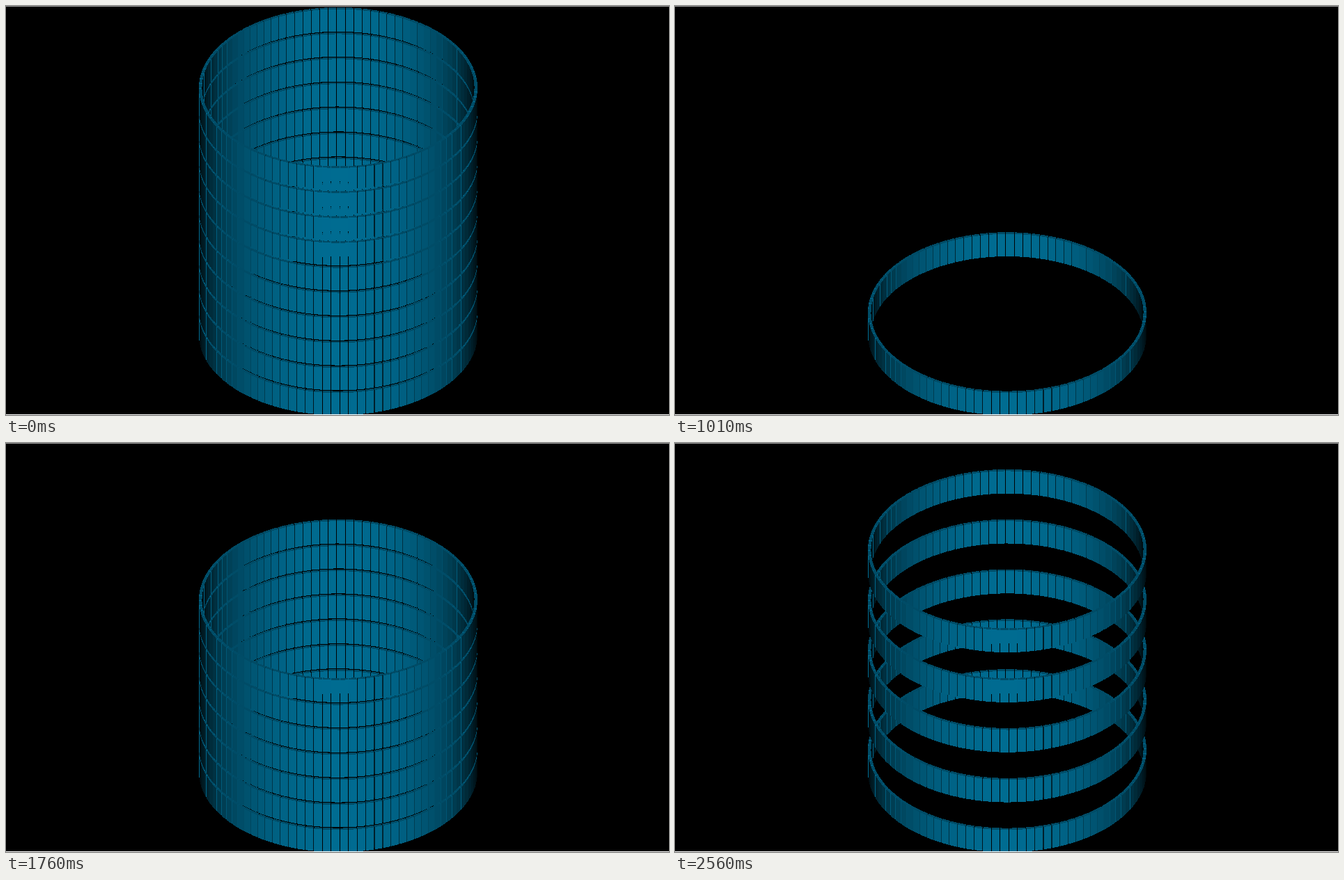
Animation, 952 px wide and 588 px high, one loop 3050 ms. Source, as an HTML page with a canvas:

```html
<!DOCTYPE html>
<html lang="en">
<head>
<meta charset="utf-8">
<title>Ring tower</title>
<style>
  html, body { margin: 0; width: 100%; height: 100%; overflow: hidden; background: #000; }
  canvas { display: block; width: 952px; height: 588px; }
</style>
</head>
<body>
<canvas id="stage" width="952" height="588"></canvas>
<script>
const W = 952, H = 588, LOOP = 3050;
const ctx = document.getElementById('stage').getContext('2d');
const image = ctx.createImageData(W, H);
const pixels = new Uint32Array(image.data.buffer);
const depth = new Float32Array(W * H);

// Isometric view of rings built from thin upright boxes
const SIN = Math.sqrt(1 / 3), COS = Math.sqrt(2 / 3);
const CX = 477, CY = 440.7, OUTER = 200, INNER = 195.5;
const BOXES = 100, BOX_W = 11.31, PHASE = 2.45;
const RING_H = 32.2, PITCH = 35.92;
const GREEN = 132, BLUE = 178;
const TOP_LINE = 0xff999999, BOTTOM_LINE = 0xffffffff, BLACK = 0xff000000;

// Each moment flips one ring on or off, starting from a full tower
const times = [240, 340, 440, 540, 640, 720, 830, 920, 1010, 1120, 1200, 1280,
  1370, 1470, 1570, 1660, 1760, 1840, 1940, 2040, 2140, 2240, 2340, 2450, 2560];
const flips = [9, 8, 7, 6, 5, 4, 3, 2, 1, 0, 0, 1,
  2, 3, 4, 5, 6, 7, 8, 9, 9, 7, 5, 3, 1];

function shade(light) {
  return (BLACK | Math.round(BLUE * light) << 16 | Math.round(GREEN * light) << 8) >>> 0;
}

// Fills a parallelogram of [x, y, z] corners, nearest surface wins
function fillQuad(q, color) {
  const [a, b, , d] = q;
  const ux = b[0] - a[0], uy = b[1] - a[1], uz = b[2] - a[2];
  const vx = d[0] - a[0], vy = d[1] - a[1], vz = d[2] - a[2];
  const det = ux * vy - uy * vx;
  if (Math.abs(det) < 1e-6) return;
  const gx = (uz * vy - vz * uy) / det, gy = (vz * ux - uz * vx) / det;
  const ys = q.map(p => p[1]);
  const top = Math.max(0, Math.ceil(Math.min(...ys) - 0.5));
  const end = Math.min(H - 1, Math.ceil(Math.max(...ys) - 0.5));
  for (let y = top; y < end; y++) {
    const py = y + 0.5;
    let lo = Infinity, hi = -Infinity;
    for (let i = 0; i < 4; i++) {
      const p = q[i], n = q[(i + 1) % 4];
      if ((p[1] <= py) === (n[1] <= py)) continue;
      const x = p[0] + (n[0] - p[0]) * (py - p[1]) / (n[1] - p[1]);
      lo = Math.min(lo, x);
      hi = Math.max(hi, x);
    }
    const last = Math.ceil(hi - 0.5);
    for (let x = Math.ceil(lo - 0.5); x < last; x++) {
      const z = a[2] + gx * (x + 0.5 - a[0]) + gy * (py - a[1]);
      const i = y * W + x;
      if (z > depth[i]) {
        depth[i] = z;
        pixels[i] = color;
      }
    }
  }
}

function drawBox(angle, base) {
  const s = Math.sin(angle), c = Math.cos(angle), half = BOX_W / 2;
  const point = (r, t, h) => {
    const x = r * s + t * c, z = r * c - t * s;
    return [CX + x, CY + z * SIN - h, z * COS + h * SIN / COS];
  };
  const lid = base + RING_H;
  const wall = (r1, t1, r2, t2, light) => {
    if (light <= 0) return;
    fillQuad([point(r1, t1, lid), point(r2, t2, lid),
      point(r2, t2, base), point(r1, t1, base)], shade(light));
  };
  wall(OUTER, -half, OUTER, half, c * COS);
  wall(INNER, -half, INNER, half, -c * COS);
  wall(INNER, half, OUTER, half, -s * COS);
  wall(INNER, -half, OUTER, -half, s * COS);
  fillQuad([point(INNER, -half, lid), point(INNER, half, lid),
    point(OUTER, half, lid), point(OUTER, -half, lid)], shade(SIN));
}

function draw(rings) {
  pixels.fill(BLACK);
  depth.fill(-1e9);
  rings.forEach((on, k) => {
    if (!on) return;
    for (let i = 0; i < BOXES; i++) {
      drawBox((PHASE + i * 360 / BOXES) * Math.PI / 180, k * PITCH - RING_H);
    }
  });
  pixels.fill(TOP_LINE, 0, W);
  pixels.fill(BOTTOM_LINE, W * (H - 1));
  ctx.putImageData(image, 0, 0);
}

let shown = -1;
function tick() {
  const t = performance.now() % LOOP;
  const step = times.filter(m => m <= t).length;
  if (step !== shown) {
    const rings = Array(10).fill(true);
    flips.slice(0, step).forEach(k => { rings[k] = !rings[k]; });
    draw(rings);
    shown = step;
  }
  requestAnimationFrame(tick);
}
tick();
</script>
</body>
</html>
```
